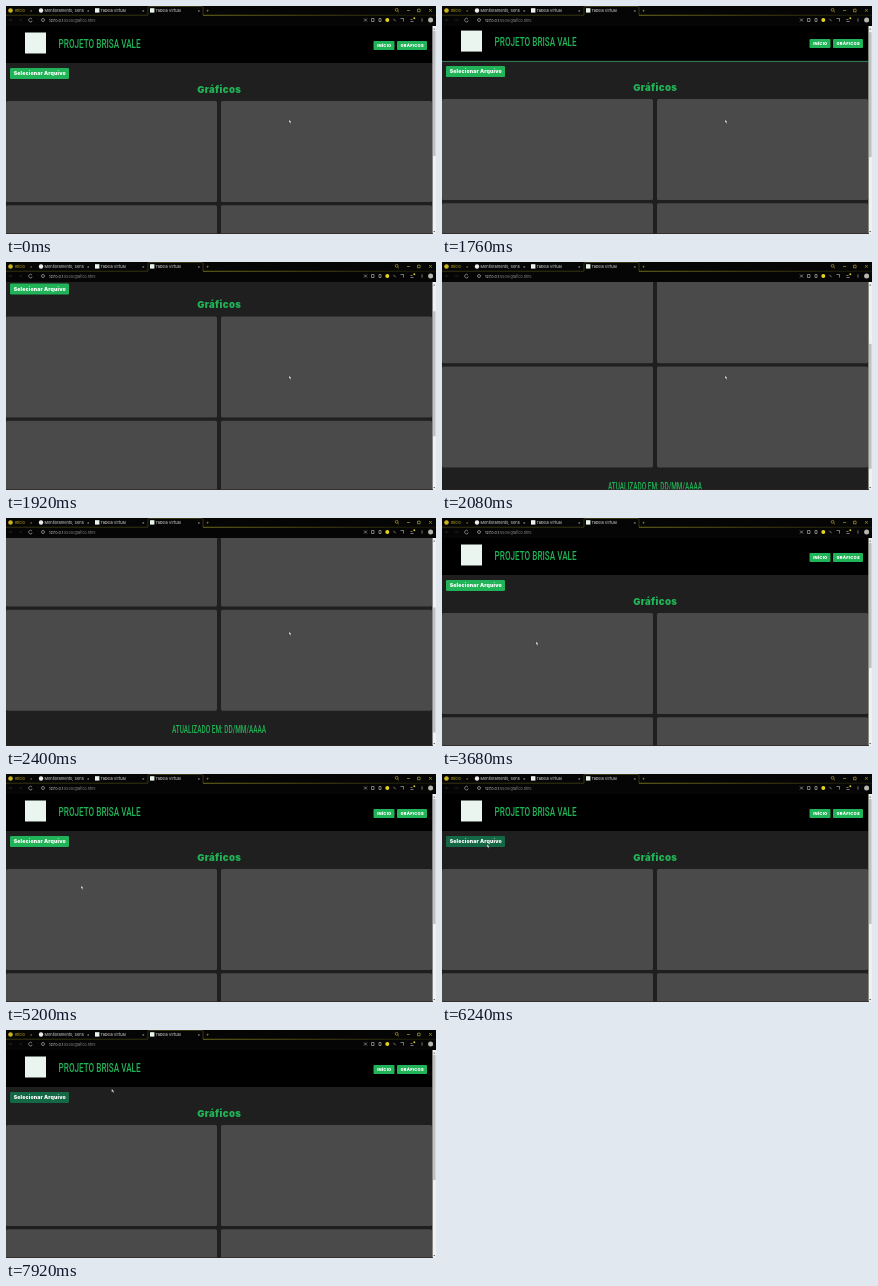
Animation, 430 px wide and 228 px high, one loop 8 s. Source, as an HTML page:

```html
<!DOCTYPE html>
<html lang="pt-BR">
<head>
<meta charset="utf-8">
<title>Gráficos</title>
<style>
html, body { margin: 0; width: 100%; height: 100%; overflow: hidden; background: #000; }
svg { display: block; width: 100vw; height: 100vh; }
text { font-family: Inter, Roboto, sans-serif; }
.tab { font-size: 3.9px; fill: #dcdcdc; }
.wide { font-weight: 900; }
.tall { font-family: Roboto, "Liberation Sans", sans-serif; font-weight: 500; font-stretch: 75%; }
.green { fill: #21b357; }
.gold { fill: #c9b31d; }
.ico { fill: none; stroke: #c4c4c4; stroke-width: .6; }
</style>
</head>
<body>
<svg viewBox="0 0 430 228" preserveAspectRatio="none">
  <defs>
    <clipPath id="view"><rect y="20" width="426.5" height="208"/></clipPath>
    <linearGradient id="fade" gradientUnits="userSpaceOnUse" x1="197" x2="430">
      <stop stop-color="#8a8420"/><stop offset="1" stop-color="#1c1b08"/>
    </linearGradient>
  </defs>
  <rect width="430" height="228" fill="#1f1f1f"/>

  <g clip-path="url(#view)"><g id="page">
    <rect y="20" width="427" height="37" fill="#000"/>
    <rect id="rule" y="56.8" width="427" height=".9" fill="#3c8f62"/>
    <rect x="19" y="26.5" width="21" height="21" fill="#e9f5ee"/>
    <text class="tall green" transform="translate(52.6 42.2) scale(.6 1)" font-size="13.6">PROJETO BRISA VALE</text>
    <g class="green">
      <rect x="367.5" y="35" width="21" height="9" rx="1"/>
      <rect x="391" y="35" width="30" height="9" rx="1"/>
    </g>
    <g class="wide" font-size="4.1" letter-spacing=".22" fill="#fff" text-anchor="middle">
      <text x="378.3" y="41.1">INÍCIO</text>
      <text x="406.2" y="41.1">GRÁFICOS</text>
    </g>
    <rect id="btn" x="4" y="62" width="59" height="11" rx="1.2"/>
    <text class="wide" x="33.8" y="69.2" font-size="5.2" letter-spacing=".13" fill="#fff" text-anchor="middle">Selecionar Arquivo</text>
    <text class="wide green" x="213.2" y="86.6" font-size="9.6" letter-spacing=".35" text-anchor="middle">Gráficos</text>
    <g id="cards" fill="#4a4a4a"></g>
    <text class="tall green" transform="translate(213 322.6) scale(.63 1)" font-size="10.2" text-anchor="middle">ATUALIZADO EM: DD/MM/AAAA</text>
  </g></g>

  <rect x="426.5" y="20" width="3.5" height="208" fill="#f1f1f1"/>
  <rect id="thumb" x="427" width="2.6" height="125" fill="#c1c1c1"/>
  <path d="M427.2 23.5l1-1.3 1 1.3zM427.2 225l1 1.3 1-1.3z" fill="#505050"/>

  <rect width="430" height="20" fill="#050505"/>
  <path d="M0 9.2H142V1.5Q142 .5 143 .5H196Q197 .5 197 1.5V9.2" fill="none" stroke="#4b4a18" stroke-width=".7"/>
  <rect x="197" y="8.8" width="233" height=".8" fill="url(#fade)"/>
  <circle class="gold" cx="4.5" cy="4.5" r="2.3"/>
  <circle cx="35" cy="4.5" r="2.2" fill="#eee"/>
  <rect x="89" y="2.2" width="4.4" height="4.4" fill="#e9f5ee"/>
  <rect x="144" y="2.2" width="4.4" height="4.4" fill="#e9f5ee"/>
  <g class="tab">
    <text class="gold" x="9" y="6">Início</text>
    <text class="gold" x="24" y="6">×</text>
    <text x="38.5" y="6">Monitoramento, Sens</text>
    <text x="81" y="6">×</text>
    <text x="94.5" y="6">Tabela Virtual</text>
    <text x="136" y="6">×</text>
    <text x="149.5" y="6">Tabela Virtual</text>
    <text x="191.5" y="6">×</text>
    <text class="gold" x="200" y="6" font-size="5">+</text>
    <text x="43" y="15.5" font-size="3.7">127.0.0.1<tspan fill="#8c8c8c">:5500/grafico.html</tspan></text>
  </g>
  <g class="ico">
    <g stroke="#c9b92c">
      <circle cx="390.6" cy="3.8" r="1.4"/>
      <path d="M391.7 5l1.3 1.3M401 4.5h3M411.5 3.2h2.6v2.6h-2.6zM423 3l2.8 2.8M425.8 3l-2.8 2.8"/>
    </g>
    <path d="M6.5 14H3.5l1.2-1.2M3.5 14l1.2 1.2M13 14h3" stroke="#333"/>
    <path d="M26 13.2A1.8 1.8 0 1 0 26.2 14.6"/>
    <circle cx="37" cy="14" r="1.5"/>
    <path d="M358 12.5l3 3M361 12.5l-3 3M365.5 12.5h2.5v3h-2.5zM373 12.5h2v3h-2z"/>
    <path d="M387.5 12.8l2 2.4M394.5 12.5h3v3M404.5 15.5h3M404.5 13.5h2M416 12.4v3.2"/>
  </g>
  <circle cx="381.3" cy="14" r="2" fill="#e3d51e"/>
  <circle cx="408.3" cy="12.3" r="1" fill="#c9c12a"/>
  <circle cx="424.6" cy="14" r="2.5" fill="#b9b5ad"/>
  <rect y="227.3" width="427" height=".7" fill="#2c2426"/>

  <path id="cursor" d="M0 0V3.6L.9 2.8 1.5 4.2 2.1 3.9 1.6 2.7H2.6z" fill="#eee" stroke="#222" stroke-width=".3"/>
</svg>
<script>
const LOOP = 8000, STEP = 80, MAX_SCROLL = 120;
const $ = id => document.getElementById(id);

for (const y of [95, 199.2]) for (const x of [0, 215]) {
  const card = document.createElementNS('http://www.w3.org/2000/svg', 'rect');
  const box = { x, y, width: 211, height: 101, rx: 1.6 };
  for (const k in box) card.setAttribute(k, box[k]);
  $('cards').append(card);
}

// eased progress from 0 to 1, starting at t0 and lasting d
const ease = (t, t0, d) => {
  const p = Math.min(1, Math.max(0, (t - t0) / d));
  return p * p * (3 - 2 * p);
};
const lerp = (a, b, p) => a + (b - a) * p;
const scrollAt = t => MAX_SCROLL * (ease(t, 1722, 508) - ease(t, 2310, 450));

// pointer stops: time, x, y
const stops = [[2960, 283, 113.5], [3200, 127, 91], [3680, 94, 123.5], [3840, 94, 123.5],
  [4000, 245, 127], [4480, 224, 176], [4720, 86, 150], [4880, 99, 148],
  [5520, 51, 75], [5840, 45, 70], [6400, 45, 70], [7440, 105.7, 58.7]];

function cursorAt(t) {
  const i = stops.findIndex(s => s[0] > t);
  if (i < 1) return stops.at(i).slice(1);
  const [a, b] = [stops[i - 1], stops[i]];
  const p = ease(t, a[0], b[0] - a[0]);
  return [lerp(a[1], b[1], p), lerp(a[2], b[2], p)];
}

function draw(ms) {
  const t = Math.floor(ms % LOOP / STEP) * STEP;
  const y = scrollAt(t), hover = ease(t, 5440, 320);
  const rgb = [[33, 20], [179, 104], [87, 69]].map(([a, b]) => Math.round(lerp(a, b, hover)));
  $('page').setAttribute('transform', `translate(0 ${-y})`);
  $('rule').setAttribute('opacity', y > 0 ? 1 : 0);
  $('thumb').setAttribute('y', 25 + y * .6);
  $('btn').setAttribute('fill', `rgb(${rgb})`);
  $('cursor').setAttribute('transform', `translate(${cursorAt(t)})`);
}

const start = performance.now();
function tick() {
  draw(performance.now() - start);
  requestAnimationFrame(tick);
}
tick();
</script>
</body>
</html>
```
